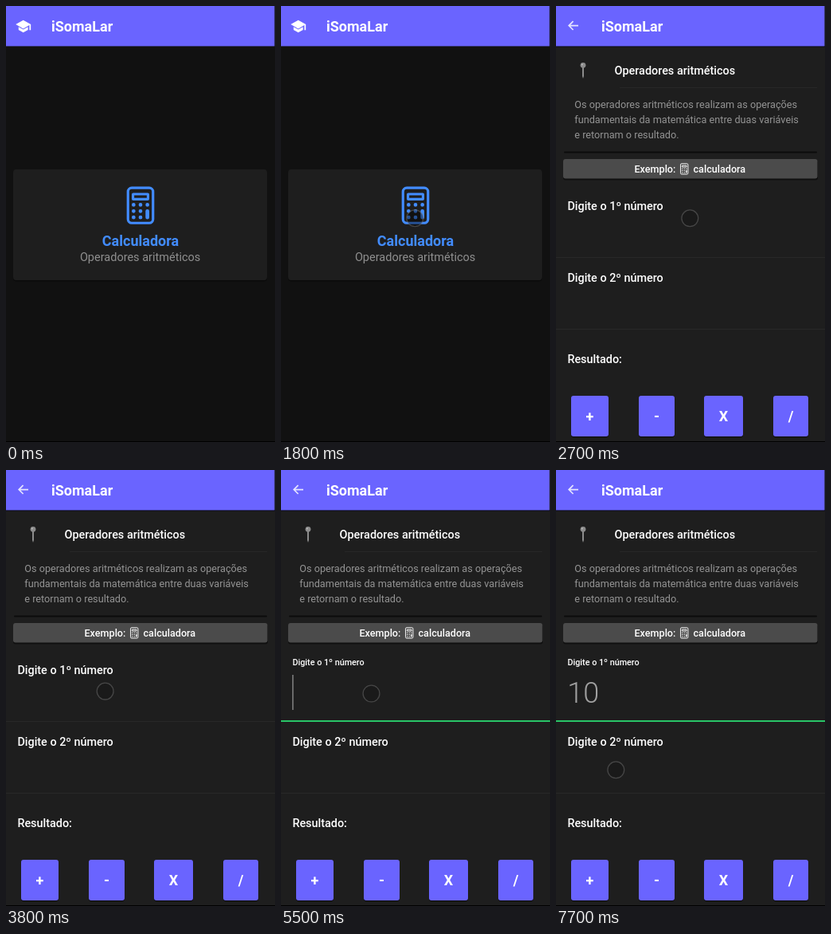
Write an HTML page that moves like this. It is 338 px wide and 547 px high and loops after 8 s.

```html
<!DOCTYPE html>
<html lang="pt">
<head>
<meta charset="utf-8">
<title>iSomaLar</title>
<style>
  html, body { margin: 0; width: 100%; height: 100%; overflow: hidden; background: #111; }
  svg { display: block; width: 338px; height: 547px; }
  text { font-family: Roboto, sans-serif; font-size: 14.4px; fill: #fff; }
  .medium { font-weight: 500; }
  .title { font-size: 18px; font-weight: 700; }
  .mid { text-anchor: middle; }
  .muted { font-size: 14.5px; fill: #8f8f8f; }
  .para { font-size: 12.7px; fill: #949494; }
  .small { font-size: 12.6px; font-weight: 500; }
  .digits { font-size: 36px; font-weight: 300; fill: #a0a0a0; }
</style>
</head>
<body>
<svg viewBox="0 0 338 547">
  <defs>
    <!-- drawn around its centre, 352 x 480 units -->
    <g id="calc" fill="none" stroke="currentColor" stroke-width="32">
      <rect x="-160" y="-224" width="320" height="448" rx="48"/>
      <rect x="-96" y="-144" width="192" height="64" rx="4"/>
      <path d="M-88 -8h0M0 -8h0M88 -8h0M-88 72h0M0 72h0M-88 152h0M0 152h0M88 72v80"
            stroke-width="48" stroke-linecap="round"/>
    </g>
  </defs>

  <g id="home">
    <rect width="338" height="547" fill="#111"/>
    <rect x="9" y="206" width="319" height="139.5" rx="4" fill="#0b0b0b"/>
    <rect x="9" y="205" width="319" height="139" rx="4" fill="#1e1e1e"/>
    <use href="#calc" transform="translate(169 250.2) scale(.0984)" color="#428cff"/>
    <text class="title mid" x="169" y="301" style="fill:#428cff">Calculadora</text>
    <text class="muted mid" x="168.6" y="320">Operadores aritméticos</text>
  </g>

  <rect id="blank" width="338" height="547" fill="#131313"/>

  <g id="form">
    <rect width="338" height="547" fill="#1e1e1e"/>
    <rect y="50" width="338" height="1.5" fill="#0c0c18"/>
    <g fill="#8c8c8c">
      <circle cx="34" cy="74.3" r="3.4"/>
      <path d="M33 77h2v11l-1 3l-1-3z"/>
      <circle cx="33" cy="73.4" r="1" fill="#bbb"/>
    </g>
    <text class="medium" x="73.5" y="86">Operadores aritméticos</text>
    <path d="M80 102.5H328" stroke="#272727"/>
    <g id="para"></g>
    <rect x="10" y="182.5" width="318" height="2" rx="1" fill="#0c0c0c"/>
    <rect x="9" y="194" width="320" height="24.5" rx="3" fill="#101010"/>
    <rect x="9" y="192" width="319.5" height="24.5" rx="3" fill="#4b4b4b"/>
    <text class="small" x="98.5" y="209">Exemplo:</text>
    <use href="#calc" transform="translate(161.2 204.4) scale(.0295)" color="#fff"/>
    <text class="small" x="172.5" y="209">calculadora</text>

    <text id="label" class="medium">Digite o 1º número</text>
    <text id="value" class="digits" x="14.2" y="292"></text>
    <rect id="caret" y="257" width="1.4" height="44" fill="#8a8a8a"/>
    <path d="M0 315.5H338M0 405.5H338" stroke="#282828"/>
    <rect id="focus" y="314" width="338" height="2" fill="#29c467"/>
    <text class="medium" x="14.4" y="346">Digite o 2º número</text>
    <text class="medium" x="14.4" y="448">Resultado:</text>
    <g id="keys"></g>
  </g>

  <g id="header">
    <rect width="337.4" height="50.4" fill="#6a64ff"/>
    <path id="cap" transform="translate(21.7 25.4) scale(.037)" fill="#fff"
          d="M0 114L-160 23V121L0 210L160 121V23zM256 -64L0 -210L-256 -64L0 82L208 -36V128H256z"/>
    <path id="back" d="M28 24.6H16.5M21.6 19.2L16.2 24.6L21.6 30" fill="none" stroke="#e4e3ff" stroke-width="1.7"/>
    <text class="title" x="57" y="32">iSomaLar</text>
  </g>

  <rect y="546" width="338" height="1" fill="#000"/>
  <circle id="pointer" r="10.4" stroke="#6e6e6e" stroke-opacity=".52" stroke-width="1.3"/>
</svg>

<script>
const LOOP = 8000, STEP = 100;
const el = id => document.getElementById(id);
const show = (id, on) => el(id).setAttribute('visibility', on ? 'visible' : 'hidden');
const set = (id, attrs) => Object.entries(attrs).forEach(([k, v]) => el(id).setAttribute(k, v));

el('para').innerHTML = [
  'Os operadores aritméticos realizam as operações',
  'fundamentais da matemática entre duas variáveis',
  'e retornam o resultado.'
].map((line, i) => `<text class="para" x="23.3" y="${128 + 19 * i}">${line}</text>`).join('');

el('keys').innerHTML = [['+', 19, 47], ['-', 104, 45], ['X', 186, 49], ['/', 273, 44]]
  .map(([sign, x, w]) => `
    <rect x="${x}" y="490.5" width="${w}" height="51" rx="3" fill="#111"/>
    <rect x="${x}" y="489" width="${w}" height="51" rx="3" fill="#6a64ff"/>
    <text class="title mid" x="${x + w / 2}" y="521">${sign}</text>`).join('');

// start, end, from, to
const moves = [
  [500, 1300, [40, 6], [168.3, 266.3]],
  [3500, 4000, [168.3, 266.3], [113.5, 280.5]],
  [7100, 7700, [113.5, 280.5], [75.3, 376.3]]
];
const labelSteps = [[4500, .17], [4600, .88], [4700, 1]];
const fillSteps = [[0, .42], [1600, .52], [1800, .42], [2700, .12]];
const valueSteps = [[0, ''], [6300, '1'], [7000, '10']];
const caretSteps = [[0, 0], [4500, 1], [5000, 0], [5500, 1], [6000, 0], [6300, 1], [6800, 0], [7000, 1], [7500, 0]];

const at = (steps, t, start) => steps.reduce((v, [time, next]) => t >= time ? next : v, start);
const easeOut = u => 1 - (1 - u) ** 1.74;

function pointerAt(t) {
  const [start, end, a, b] = moves.filter(m => t >= m[0]).pop() || moves[0];
  const k = easeOut(Math.min(1, Math.max(0, (t - start) / (end - start))));
  return a.map((v, i) => v + (b[i] - v) * k);
}

function draw(now) {
  const t = Math.floor(now % LOOP / STEP) * STEP;
  const blank = t >= 2500 && t < 2700, form = t >= 2700;
  show('home', t < 2500);
  show('blank', blank);
  show('form', form);
  show('header', !blank);
  show('cap', t < 2500);
  show('back', form);

  const lift = at(labelSteps, t, 0);
  set('label', { transform: `translate(14.4 ${256 - 11 * lift}) scale(${1 - .25 * lift})` });
  el('label').style.fill = lift > 0 && lift < 1 ? '#e6e6e6' : '#fff';
  show('focus', t >= 4500);

  const value = at(valueSteps, t);
  el('value').textContent = value;
  set('caret', { x: 14.2 + 20.2 * value.length });
  // visibility must stay off while the form itself is hidden
  show('caret', form && at(caretSteps, t));

  const [cx, cy] = pointerAt(t);
  set('pointer', { cx, cy, fill: `rgba(0,0,0,${at(fillSteps, t)})` });
  show('pointer', t >= 500);
}

const origin = performance.now();
function tick() {
  draw(performance.now() - origin);
  requestAnimationFrame(tick);
}
tick();
</script>
</body>
</html>
```
